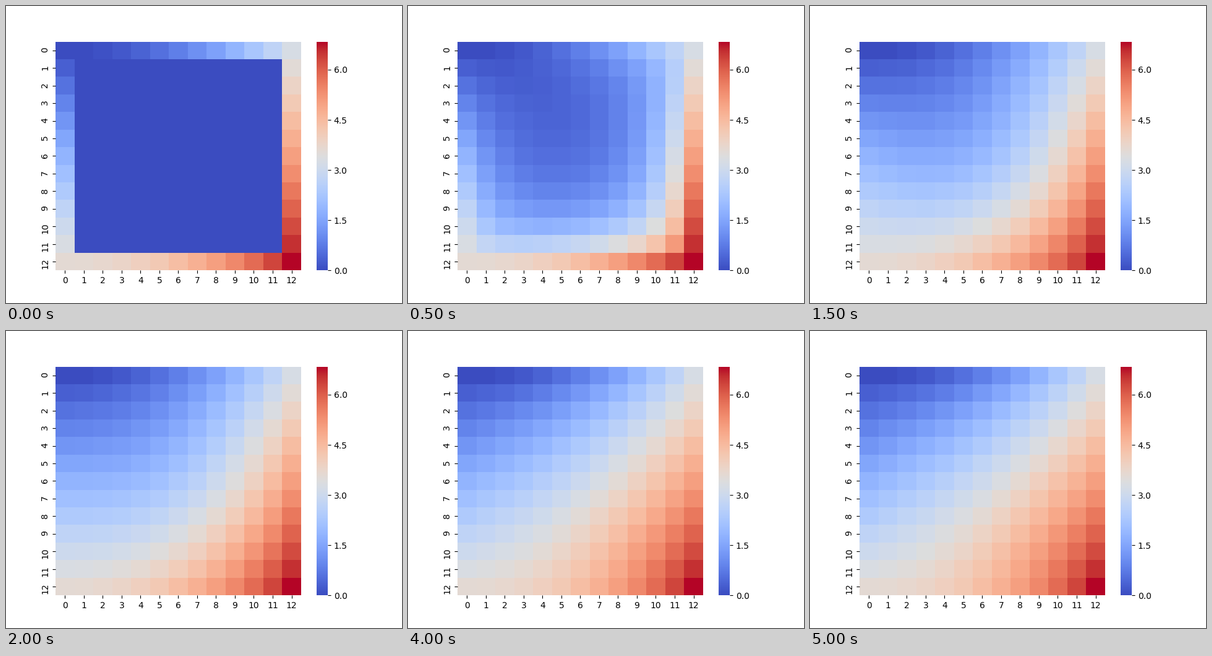
A matplotlib script for the animation above (8 s loop, 640 by 480 pixels).

```python
import numpy as np
import matplotlib.pyplot as plt
from matplotlib.animation import FuncAnimation
from matplotlib.ticker import MaxNLocator

# Heat equation u_t = u_xx + u_yy on a square, implicit Euler in time
N = 13
H = 0.15
TAU = 0.1
FRAMES = 16
INTERVAL = 500


def start_state():
    """Zero inside, x^2 + 2y held on the border."""
    axis = np.arange(N) * H
    x, y = np.meshgrid(axis, axis)
    u = x**2 + 2 * y
    u[1:-1, 1:-1] = 0
    return u


def step_matrix():
    m = N - 2
    eye = np.eye(m)
    second = np.eye(m, k=1) + np.eye(m, k=-1) - 2 * eye
    laplace = np.kron(second, eye) + np.kron(eye, second)
    return np.linalg.inv(np.eye(m * m) - TAU / H**2 * laplace)


def advance(u, inverse):
    rhs = u[1:-1, 1:-1].copy()
    s = TAU / H**2
    rhs[0] += s * u[0, 1:-1]
    rhs[-1] += s * u[-1, 1:-1]
    rhs[:, 0] += s * u[1:-1, 0]
    rhs[:, -1] += s * u[1:-1, -1]
    new = u.copy()
    new[1:-1, 1:-1] = (inverse @ rhs.ravel()).reshape(rhs.shape)
    return new


inverse = step_matrix()
states = [start_state()]
while len(states) < FRAMES:
    states.append(advance(states[-1], inverse))

fig, ax = plt.subplots(figsize=(6.4, 4.8), dpi=100)
mesh = ax.pcolormesh(states[0], cmap="coolwarm", vmin=0, vmax=states[0].max())
ax.set(xlim=(0, N), ylim=(N, 0))
ax.spines[:].set_visible(False)

bar = fig.colorbar(mesh, ax=ax, ticks=MaxNLocator(6))
bar.outline.set_linewidth(0)

centers = np.arange(N) + 0.5
labels = [str(i) for i in range(N)]
ax.set_xticks(centers, labels)
ax.set_yticks(centers, labels, rotation="vertical")


def update(i):
    mesh.set_array(states[i])
    return (mesh,)


anim = FuncAnimation(fig, update, frames=FRAMES, interval=INTERVAL,
                     repeat=True, repeat_delay=0)
plt.show()
```
